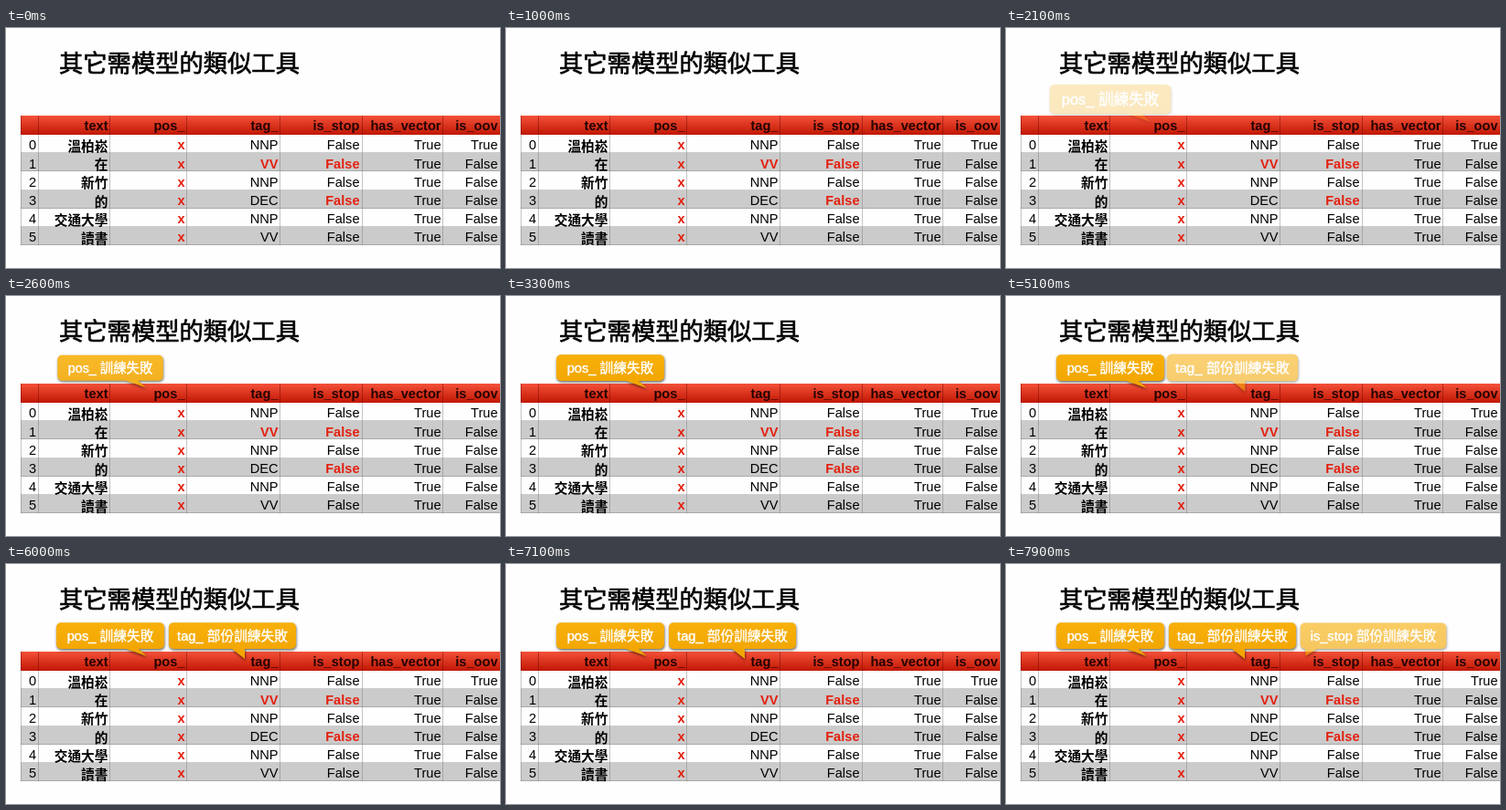
These frames come from a looping animation (540 px wide and 263 px high, 8 s). An HTML page with a canvas:

```html
<!DOCTYPE html>
<html lang="zh-TW">
<head>
<meta charset="utf-8">
<style>
html, body { margin: 0; width: 100%; height: 100%; overflow: hidden; background: #fefefe; }
canvas { display: block; width: 540px; height: 263px; }
</style>
</head>
<body>
<canvas id="stage"></canvas>
<script>
const W = 540, H = 263, LOOP = 8000;
const LATIN = '"Liberation Sans", "Noto Sans CJK TC", sans-serif';
const CJK = '"Noto Sans CJK TC", "Noto Sans CJK", sans-serif';
const RED = '#e3200f';
const ratio = window.devicePixelRatio || 1;

function setup(canvas) {
  canvas.width = W * ratio;
  canvas.height = H * ratio;
  const c = canvas.getContext('2d');
  c.scale(ratio, ratio);
  c.lineJoin = 'round';
  return c;
}
const ctx = setup(document.getElementById('stage'));
const layer = document.createElement('canvas');
const lctx = setup(layer);

// Left edge of each column, and the right edge of its text
const lines = [16, 35, 113, 197, 299, 389, 477];
const ends = [33, 111.5, 195.5, 297.5, 386.5, 475.5, 537.5];
const heads = ['', 'text', 'pos_', 'tag_', 'is_stop', 'has_vector', 'is_oov'];
const rows = [
  ['0', '溫柏崧', 'x', 'NNP', 'False', 'True', 'True'],
  ['1', '在', 'x', 'VV', 'False', 'True', 'False'],
  ['2', '新竹', 'x', 'NNP', 'False', 'True', 'False'],
  ['3', '的', 'x', 'DEC', 'False', 'True', 'False'],
  ['4', '交通大學', 'x', 'NNP', 'False', 'True', 'False'],
  ['5', '讀書', 'x', 'VV', 'False', 'True', 'False']
];
const marked = ['1,3', '1,4', '3,4'];
const LEFT = 16, TOP = 96, BODY = 117, ROW = 20.2;

// Body extent, start of the tail's base and its tip
const bubbles = [
  { at: 1900, x: 55, w: 118, tail: 131, tip: [154, 101], text: 'pos_ 訓練失敗' },
  { at: 4650, x: 178, w: 139, tail: 247, tip: [261, 104], text: 'tag_ 部份訓練失敗' },
  { at: 7400, x: 321, w: 161, tail: 326, tip: [327, 101], text: 'is_stop 部份訓練失敗' }
];

// A positive weight thickens the strokes of the text
function label(c, text, x, y, font, color, align, weight = 0) {
  c.font = font;
  c.fillStyle = c.strokeStyle = color;
  c.textAlign = align;
  c.fillText(text, x, y);
  if (weight) {
    c.lineWidth = weight;
    c.strokeText(text, x, y);
  }
}

function drawTable() {
  const g = ctx.createLinearGradient(0, TOP, 0, BODY);
  g.addColorStop(0, '#f4513a');
  g.addColorStop(1, '#c01703');
  ctx.fillStyle = g;
  ctx.fillRect(LEFT, TOP, W - LEFT, BODY - TOP);

  const rowTop = r => Math.round(BODY + r * ROW);
  for (let r = 0; r < 6; r++) {
    ctx.fillStyle = r % 2 ? '#cbcbcb' : '#fefefe';
    ctx.fillRect(LEFT, rowTop(r), W - LEFT, rowTop(r + 1) - rowTop(r));
  }

  ctx.fillStyle = 'rgba(90,90,90,.3)';
  for (let r = 1; r <= 6; r++) ctx.fillRect(LEFT, rowTop(r) - 1, W - LEFT, 1);
  for (const x of lines) {
    ctx.fillStyle = 'rgba(110,10,0,.45)';
    ctx.fillRect(x, TOP, 1, BODY - TOP);
    ctx.fillStyle = 'rgba(110,110,110,.4)';
    ctx.fillRect(x, BODY, 1, 6 * ROW);
  }

  heads.forEach((h, i) =>
    label(ctx, h, ends[i], 112, 'bold 14.6px ' + LATIN, '#240300', 'right'));

  rows.forEach((row, r) => row.forEach((s, i) => {
    const hot = i === 2 || marked.includes(r + ',' + i);
    const font = i === 1 ? 'bold 14.7px ' + CJK : (hot ? 'bold ' : '') + '14.6px ' + LATIN;
    const y = BODY + r * ROW + (i === 1 ? 18 : 16.3);
    label(ctx, s, ends[i], y, font, hot ? RED : '#000', 'right');
  }));
}

function bubblePath(c, b) {
  const l = b.x, r = b.x + b.w, t = 64.3, m = 93, k = 5;
  c.beginPath();
  c.moveTo(l + k, t);
  c.arcTo(r, t, r, m, k);
  c.arcTo(r, m, l, m, k);
  c.lineTo(b.tail + 14, m);
  c.lineTo(...b.tip);
  c.lineTo(b.tail, m);
  c.arcTo(l, m, l, t, k);
  c.arcTo(l, t, r, t, k);
  c.closePath();
}

function drawBubble(b, time) {
  const t = (time - b.at) / 1000;
  if (t <= 0) return;
  // Damped spring around full size
  const scale = t > 1.1 ? 1 : 1 - Math.exp(-5.3 * t) * Math.cos(2 * Math.PI * t / 0.65);
  const cx = b.x + b.w / 2, cy = 83;
  lctx.clearRect(0, 0, W, H);
  lctx.save();
  lctx.translate(cx, cy);
  lctx.scale(scale, scale);
  lctx.translate(-cx, -cy);

  lctx.save();
  lctx.shadowColor = 'rgba(0,0,0,.6)';
  lctx.shadowBlur = 3 * ratio;
  lctx.shadowOffsetX = 0.5 * ratio;
  lctx.shadowOffsetY = 1.5 * ratio;
  const g = lctx.createLinearGradient(0, 64, 0, 102);
  g.addColorStop(0, '#f8b00a');
  g.addColorStop(1, '#f0a400');
  lctx.fillStyle = g;
  bubblePath(lctx, b);
  lctx.fill();
  lctx.restore();

  label(lctx, b.text, cx, 84, '14.7px ' + LATIN, '#fff', 'center', 0.4);
  lctx.restore();

  ctx.save();
  ctx.globalAlpha = Math.min(1, t / 0.8);
  ctx.drawImage(layer, 0, 0, W, H);
  ctx.restore();
}

function draw(time) {
  ctx.fillStyle = '#fefefe';
  ctx.fillRect(0, 0, W, H);
  label(ctx, '其它需模型的類似工具', 58, 48.4, '26.3px ' + CJK, '#000', 'left', 0.7);
  drawTable();
  for (const b of bubbles) drawBubble(b, time);
}

const start = performance.now();
function tick() {
  draw((performance.now() - start) % LOOP);
  requestAnimationFrame(tick);
}
tick();
</script>
</body>
</html>
```
